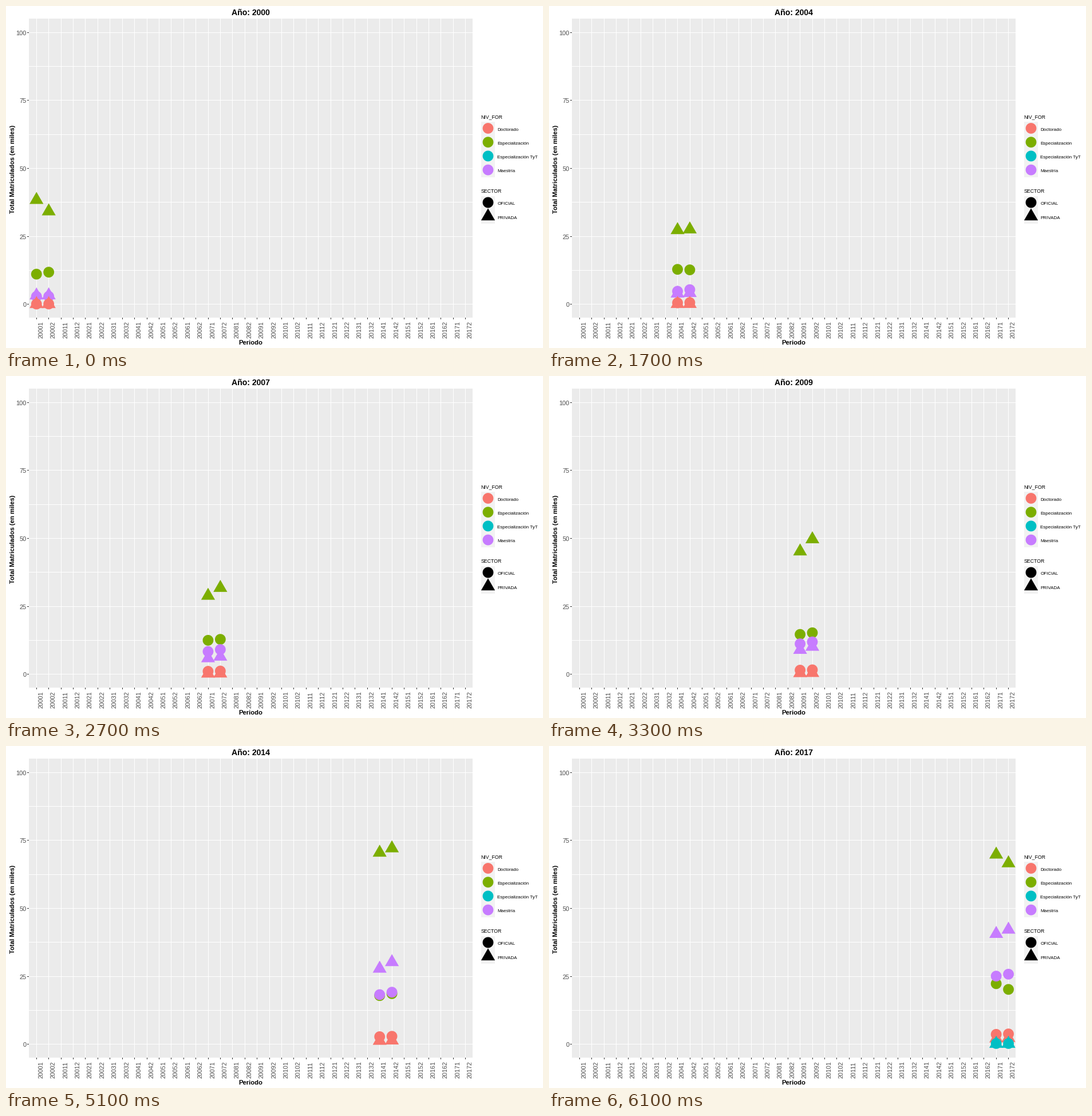
Animation of 938x597 px, one loop 8000 ms. Source, as a matplotlib script:

```python
import numpy as np
import matplotlib.pyplot as plt
from matplotlib.animation import FuncAnimation
from matplotlib.patches import Polygon, Rectangle

W, H, DPI = 938, 597, 64
STEP = 100            # ms per drawn frame
LOOP = 8000
LAST = 29             # number of moves from first to last year
YEARS = np.arange(18)
LEFT, RIGHT, TOP, BOTTOM = 40, 815, 22, 544
DX = (RIGHT - LEFT) / 36.2
DY = (BOTTOM - TOP) / 110

RED, GREEN, CYAN, PURPLE = "#F8766D", "#7CAE00", "#00BFC4", "#C77CFF"
GREY = "#4D4D4D"


def path(*keys):
    """Straight lines through (year, value) key points."""
    return lambda t: np.interp(t, *zip(*keys))


def power(top, exponent):
    return lambda t: top * (t / 17.25) ** exponent


def logistic(base, rise, rate, middle):
    return lambda t: base + rise / (1 + np.exp(-rate * (t - middle)))


# Thousands enrolled as a curve over the years since 2000, back to front.
SERIES = [
    (GREEN, "circle", path((0, 11), (2.2, 14.2), (4.2, 12.6), (7.2, 12.4),
                           (11, 17), (11.5, 14.3), (14.2, 18.1),
                           (17, 22.2), (17.5, 20.1))),
    (GREEN, "triangle", path((0, 38.3), (0.5, 34.1), (2, 35.9), (2.5, 40.6),
                             (4, 27.2), (7, 28.8), (7.5, 31.7), (11, 63),
                             (11.5, 62.4), (14.5, 72), (17, 69.7),
                             (17.5, 66.5))),
    (PURPLE, "circle", path((0, 2.8), (2.5, 2.9), (7, 8.3), (14.3, 18.6),
                            (17.3, 25.7))),
    (PURPLE, "triangle", logistic(3, 48, 0.405, 13.85)),
    (RED, "circle", power(3.65, 1.43)),
    (RED, "triangle", power(2.15, 2.8)),
    (CYAN, "circle", path((0, 0.2))),
    (CYAN, "triangle", path((0, 0.1))),
]

angle = np.linspace(0, 2 * np.pi, 60, endpoint=False)
SHAPES = {
    "circle": 9.4 * np.column_stack([np.cos(angle), np.sin(angle)]),
    "triangle": 9 * np.array([[0, -1.555], [1.347, 0.778], [-1.347, 0.778]]),
}

fig = plt.figure(figsize=(W / DPI, H / DPI), dpi=DPI, facecolor="white")
ax = fig.add_axes([0, 0, 1, 1])
ax.set_xlim(0, W)
ax.set_ylim(H, 0)
ax.axis("off")


def px(i):
    return LEFT + (0.6 + i) * DX


def py(v):
    return BOTTOM - (v + 5) * DY


def box(x, y, w, h, color):
    ax.add_patch(Rectangle((x, y), w, h, fc=color, lw=0))


def text(x, y, s, size, color="black", ha="left", bold=False, turn=0):
    return ax.text(x, y, s, fontsize=size * 72 / DPI, color=color, ha=ha,
                   va="baseline", rotation=turn, rotation_mode="anchor",
                   family="Liberation Sans",
                   weight="bold" if bold else "normal")


def marker(shape, color, x=0, y=0):
    return ax.add_patch(Polygon(SHAPES[shape] + [x, y], fc=color, lw=0))


def draw_panel():
    box(LEFT, TOP, RIGHT - LEFT, BOTTOM - TOP, "#EBEBEB")
    for v in np.arange(0, 101, 12.5):
        box(LEFT, round(py(v)), RIGHT - LEFT, 1, "white")
    for v in range(0, 101, 25):
        y = round(py(v))
        box(LEFT - 3, y, 3, 1, "#333333")
        text(36, y + 5, str(v), 11, GREY, "right")
    for i in range(36):
        x = round(px(i))
        box(x, TOP, 1, BOTTOM - TOP, "white")
        box(x, BOTTOM, 1, 3, "#333333")
        text(x + 11, 579.5, f"{2000 + i // 2}{i % 2 + 1}", 10.7, GREY, turn=90)
    text(427.5, 591, "Periodo", 11.3, ha="center", bold=True)
    text(15, 285, "Total Matriculados (en miles)", 11.2, ha="center",
         bold=True, turn=90)


def draw_legend(title, top, entries):
    text(829.5, top - 6, title, 8.7)
    box(830, top, 24, round(24.2 * len(entries)), "#F2F2F2")
    for i, (label, shape, color) in enumerate(entries):
        y = top + 11.5 + 24.2 * i
        marker(shape, color, 842, y)
        text(858.5, y + 4.3, label, 8)


draw_panel()
draw_legend("NIV_FOR", 202, [("Doctorado", "circle", RED),
                             ("Especialización", "circle", GREEN),
                             ("Especialización TyT", "circle", CYAN),
                             ("Maestría", "circle", PURPLE)])
draw_legend("SECTOR", 331.5, [("OFICIAL", "circle", "black"),
                              ("PRIVADA", "triangle", "black")])
title = text(427, 16, "", 14, ha="center", bold=True)
points = [(marker(shape, color), color, shape, half, curve(YEARS + half / 2))
          for color, shape, curve in SERIES for half in (0, 1)]

# Each year is reached exactly on a whole move; points glide in between.
stops = np.round(YEARS * LAST / YEARS[-1])


def update(frame):
    t = frame * STEP
    move = 0 if t < 500 else min(LAST, (t - 500) // 200 + 1)
    year = np.interp(move, stops, YEARS)
    title.set_text(f"Año: {round(2000 + YEARS[-1] * move / LAST)}")
    for patch, color, shape, half, values in points:
        y = py(np.interp(year, YEARS, values))
        patch.set_xy(SHAPES[shape] + [px(2 * year + half) + 0.4, y])
        patch.set_visible(color != CYAN or move == LAST)
    return [title] + [p[0] for p in points]


anim = FuncAnimation(fig, update, frames=LOOP // STEP, interval=STEP,
                     init_func=lambda: update(0), repeat=True, repeat_delay=0)
plt.show()
```
